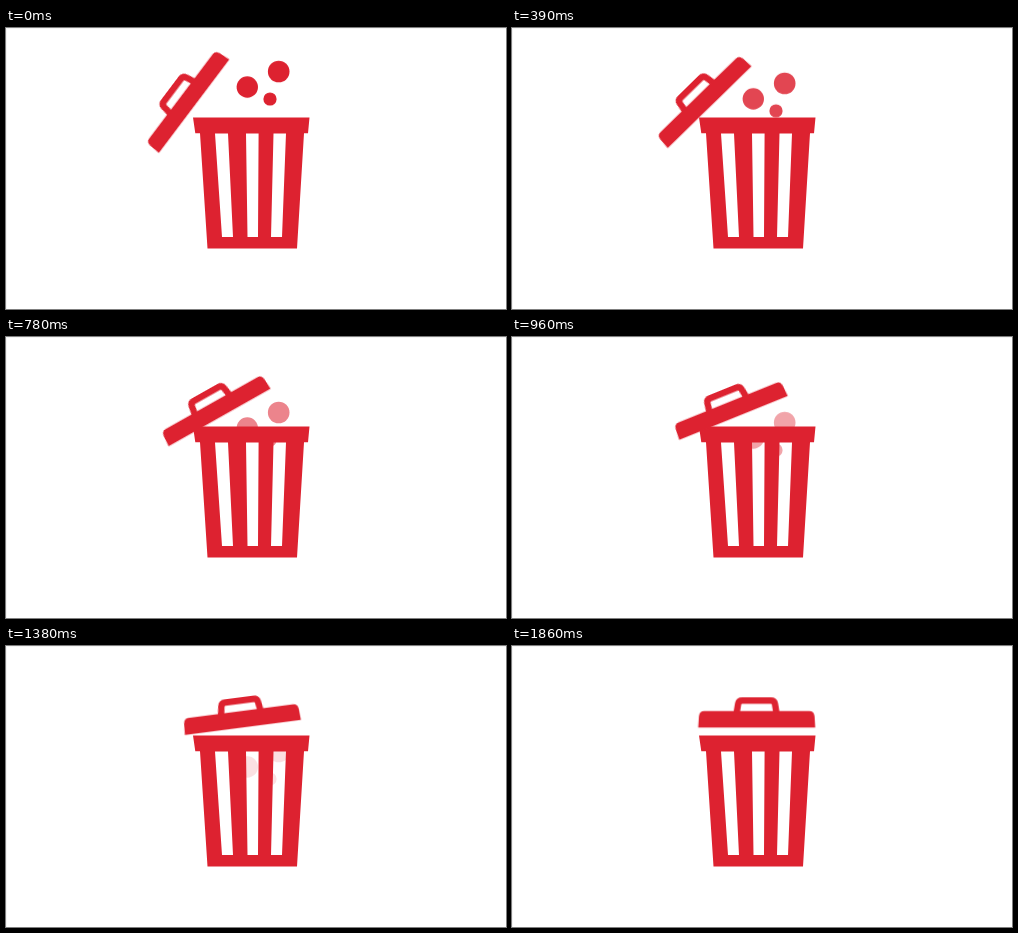
Recreate the animation shown at these times as an HTML page without scripts. Size 500 by 281 pixels, loop 1.92 s.

```html
<!DOCTYPE html>
<html lang="en">
<head>
<meta charset="utf-8">
<title>Closing bin</title>
<style>
  html, body { margin: 0; width: 100%; height: 100%; overflow: hidden; background: #fff; }
  svg { display: block; width: 100%; height: 100%; }
  .art { fill: #dd2230; filter: blur(.5px); }
  .lid, .balls { animation: 1920ms cubic-bezier(.35, .14, .6, .95) infinite; }
  .lid { animation-name: close; }
  .balls { animation-name: drop; }
  .handle { fill: none; stroke: #dd2230; stroke-width: 6.4; }

  /* Both parts share one progress curve and rest for the last 60 ms */
  @keyframes close {
    0% { transform: translate(181.5px, 73.3px) rotate(-53deg); }
    96.875%, 100% { transform: translate(244.7px, 73.3px) rotate(0deg); }
  }
  @keyframes drop {
    0% { transform: translateY(0); opacity: 1; }
    96.875%, 100% { transform: translateY(72px); opacity: 0; }
  }
</style>
</head>
<body>
<svg viewBox="0 0 500 281">
  <path d="M.5 281V.5H500" fill="none" stroke="#f3f3f3"/>
  <g class="art">
    <g class="balls">
      <circle cx="241.3" cy="59" r="10.7"/>
      <circle cx="272.7" cy="43.5" r="10.8"/>
      <circle cx="264" cy="71" r="6.6"/>
    </g>
    <path d="M187 89.5H303.5L302 105.3H298L291 220.5H201.5L194 105.3H189.3Z
             M209 105.5L216 209H227L222 105.5Z
             M240 105.5L241.5 209H252L252.6 105.5Z
             M267.5 105.5L265 209H276L280 105.5Z" fill-rule="evenodd"/>
    <g class="lid">
      <path d="M-58.5 8.2L-57.8 -3Q-57.3 -8.3 -52.5 -8.3H52.5Q57.3 -8.3 57.8 -3L58.5 8.2Z"/>
      <path class="handle" d="M-20 -7L-18.6 -15.5Q-18 -18.8 -14.5 -18.8H14Q17.6 -18.8 18.2 -15.5L19.6 -7"/>
    </g>
  </g>
</svg>
</body>
</html>
```
